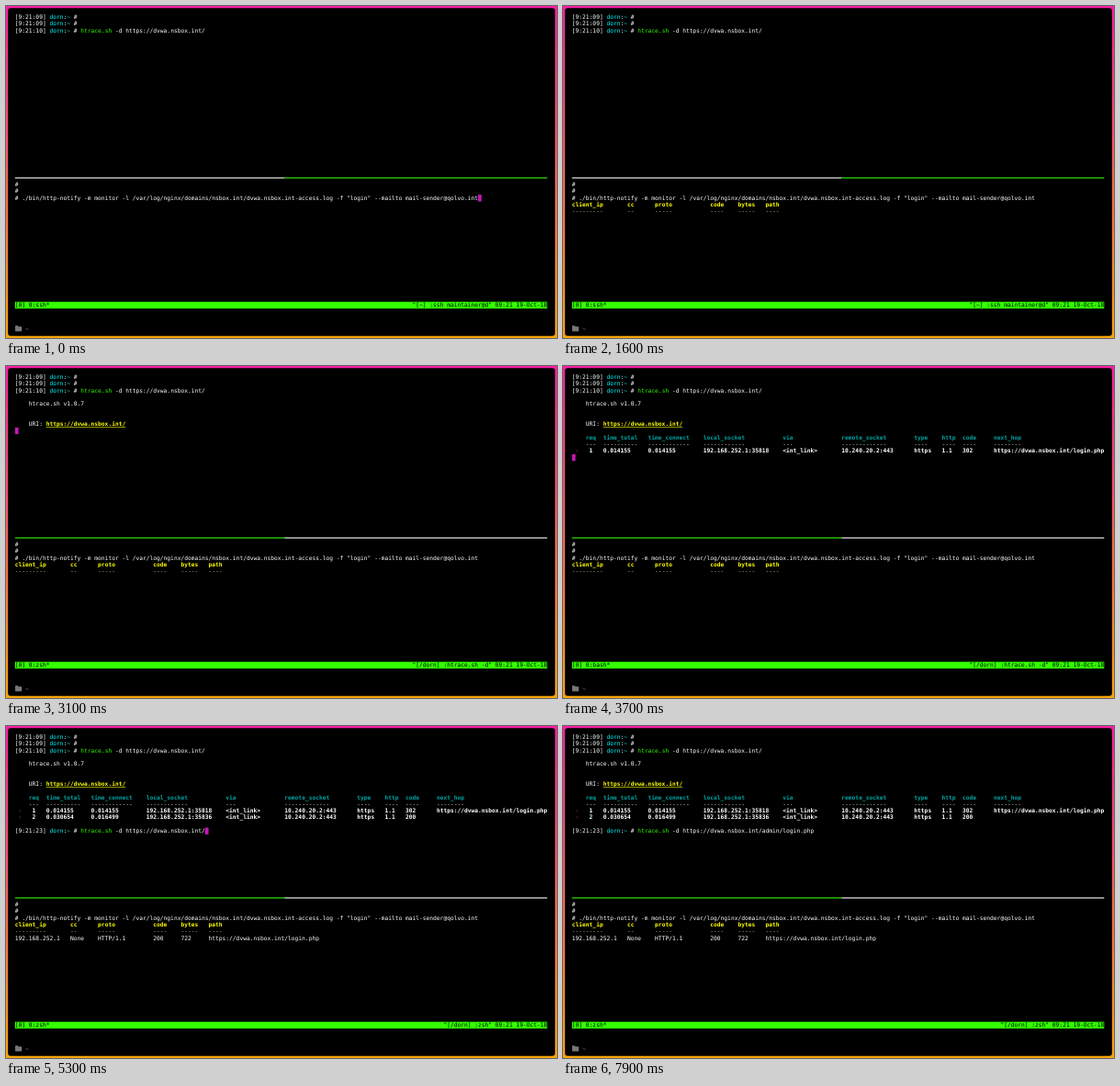
Animation of 600 by 361 pixels, one loop 8 s. Source, as an HTML page:

```html
<!DOCTYPE html>
<html lang="en">
<head>
<meta charset="utf-8">
<title>Terminal session</title>
<style>
  html, body { margin: 0; height: 100%; overflow: hidden; background: #000; }
  svg { display: block; }
  text {
    font: 6.25px "DejaVu Sans Mono", monospace;
    text-rendering: geometricPrecision;
    white-space: pre;
  }
  .bold { font-weight: bold; }
</style>
</head>
<body>
<svg id="stage" width="600" height="361" viewBox="0 0 600 361">
  <defs>
    <linearGradient id="edge" x1="0" y1="0" x2="0" y2="1">
      <stop offset="0" stop-color="#fc1da7"/>
      <stop offset="1" stop-color="#fba506"/>
    </linearGradient>
  </defs>
  <rect width="600" height="361" fill="url(#edge)"/>
  <rect x="2.15" y="2.15" width="595.7" height="356.7" rx="3"/>
  <path d="M10 348.2q0-.7.7-.7h2l.8.9h3q.7 0 .7.7v4q0 .7-.7.7h-5.8q-.7 0-.7-.7z" fill="#777"/>
  <text x="21" y="353.2" fill="#8a8a8a">~</text>
</svg>
<script>
const LOOP = 8000, COLS = 154, SPLIT = 78;
const X0 = 9.8, Y0 = 8.6, CW = 3.763, RH = 7.28, BASE = 5.53;
const WHITE = '#fff', CYAN = '#00ffff', TEAL = '#00a3a3', GREEN = '#33ff00',
      YELLOW = '#ffff00', GREY = '#808080', PINK = '#f81ce5';
const stage = document.getElementById('stage');
const timed = [];

const colX = c => X0 + c * CW;
const rowY = r => Y0 + r * RH;

function add(from, to, tag, attrs, content = '') {
  const el = document.createElementNS('http://www.w3.org/2000/svg', tag);
  for (const k in attrs) el.setAttribute(k, attrs[k]);
  el.textContent = content;
  stage.append(el);
  timed.push({ el, from, to });
}

function put(from, to, row, col, content, fill = WHITE, bold = false) {
  add(from, to, 'text',
    { x: colX(col), y: rowY(row) + BASE, fill, class: bold ? 'bold' : '' }, content);
}

function cells(from, row, cols, words, fill, bold) {
  words.forEach((word, i) => put(from, LOOP, row, cols[i], word, fill, bold));
}

const rules = words => words.map(w => '-'.repeat(w.length));

function block(from, to, row, col, width, fill, opacity = 1) {
  add(from, to, 'rect',
    { x: colX(col), y: rowY(row), width: width * CW, height: RH, fill, opacity });
}

const cursor = (from, to, row, col, opacity = 0.8) =>
  block(from, to, row, col, 1, PINK, opacity);

function prompt(from, row, clock) {
  put(from, LOOP, row, 0, `[${clock}]`);
  put(from, LOOP, row, 10, 'dorn', CYAN);
  put(from, LOOP, row, 14, ':');
  put(from, LOOP, row, 15, '~', CYAN);
  put(from, LOOP, row, 17, '#');
}

function trace(from, row) {
  put(from, LOOP, row, 19, 'htrace.sh', GREEN);
  put(from, LOOP, row, 29, '-d https://dvwa.nsbox.int/');
}

function divider(from, to, left, right) {
  const line = (a, b, fill) => add(from, to, 'rect',
    { x: colX(a), y: 186.4, width: (b - a) * CW, height: 1.1, fill });
  line(0, SPLIT, left);
  line(SPLIT, COLS, right);
}

// Upper pane
prompt(0, 0, '9:21:09');
prompt(0, 1, '9:21:09');
prompt(0, 2, '9:21:10');
trace(0, 2);

put(3100, LOOP, 4, 4, 'htrace.sh v1.0.7');
put(3100, LOOP, 7, 4, 'URI:');
put(3100, LOOP, 7, 9, 'https://dvwa.nsbox.int/', YELLOW, true);
add(3100, LOOP, 'rect',
  { x: colX(9), y: rowY(7) + BASE + 0.9, width: 23 * CW, height: 0.6, fill: YELLOW });

const hopCols = [4, 9, 22, 38, 61, 78, 99, 107, 113, 122];
const hopHead = ['req', 'time_total', 'time_connect', 'local_socket', 'via',
  'remote_socket', 'type', 'http', 'code', 'next_hop'];
cells(3700, 9, hopCols, hopHead, TEAL, true);
cells(3700, 10, hopCols, rules(hopHead), '#ddd');

function hop(from, row, req, total, connect, port, code, next) {
  put(from, LOOP, row, 1, '›', '#a33');
  cells(from, row, [5, ...hopCols.slice(1)],
    [req, total, connect, '192.168.252.1:' + port, '<int_link>',
      '10.240.20.2:443', 'https', '1.1', code, next], WHITE, true);
}
hop(3700, 11, '1', '0.014155', '0.014155', '35818', '302', 'https://dvwa.nsbox.int/login.php');
hop(3900, 12, '2', '0.030654', '0.016499', '35836', '200', '');

prompt(4100, 14, '9:21:23');
trace(5300, 14);

// Typed path with its grey completion
const path = 'admin/login.php';
[[6100, 6200, 1, false], [6200, 6300, 1, true], [6300, 6400, 2, true],
 [6400, 7100, 3, true], [7100, LOOP, path.length, false]]
  .forEach(([from, to, typed, hint]) => {
    put(from, to, 14, 55, path.slice(0, typed));
    if (hint) put(from, to, 14, 55 + typed, path.slice(typed), GREY);
  });

divider(0, 1900, WHITE, GREEN);
divider(1900, LOOP, GREEN, WHITE);

// Lower pane
put(0, LOOP, 25, 0, '#');
put(0, LOOP, 26, 0, '#');
put(0, LOOP, 27, 0, '# ./bin/http-notify -m monitor -l /var/log/nginx/domains/nsbox.int/' +
  'dvwa.nsbox.int-access.log -f "login" --mailto mail-sender@qolvo.int');

const logCols = [0, 16, 24, 40, 48, 56];
const logHead = ['client_ip', 'cc', 'proto', 'code', 'bytes', 'path'];
cells(800, 28, logCols, logHead, YELLOW, true);
cells(800, 29, logCols, rules(logHead), '#c8c88a');
cells(3900, 30, logCols,
  ['192.168.252.1', 'None', 'HTTP/1.1', '200', '722', 'https://dvwa.nsbox.int/login.php']);

// Status bar
block(0, LOOP, 43, 0, COLS, GREEN);
[[0, 1900, 'ssh'], [1900, 3700, 'zsh'], [3700, 5300, 'bash'], [5300, LOOP, 'zsh']]
  .forEach(([from, to, name]) => put(from, to, 43, 0, `[0] 0:${name}*`, '#000'));
[[0, 1900, '[~] :ssh maintainer@d'], [1900, 3100, '[/dorn] :zsh'],
 [3100, 4100, '[/dorn] :htrace.sh -d'], [4100, LOOP, '[/dorn] :zsh']]
  .forEach(([from, to, title]) => {
    const label = `"${title}" 09:21 19-Oct-18`;
    put(from, to, 43, COLS - label.length, label, '#000');
  });

// Cursor: from, to, row, column, opacity
[[0, 400, 27, 134], [400, 500, 27, 134, 0.4],
 [800, 900, 30, 0, 0.4], [900, 1600, 30, 0],
 [1900, 2600, 2, 55],
 [3000, 3100, 3, 0], [3100, 3700, 8, 0], [3700, 3900, 12, 0], [3900, 4100, 13, 0],
 [4100, 4200, 14, 19, 0.4], [4200, 4900, 14, 19],
 [5300, 6100, 14, 55], [6100, 6300, 14, 56], [6300, 6400, 14, 57], [6400, 7100, 14, 58],
 [7100, 7200, 14, 70, 0.4], [7200, 7900, 14, 70]]
  .forEach(step => cursor(...step));

const start = performance.now();
function draw(now) {
  const t = Math.max(0, now - start) % LOOP;
  for (const { el, from, to } of timed)
    el.style.display = t >= from && t < to ? '' : 'none';
  requestAnimationFrame(draw);
}
draw(start);
</script>
</body>
</html>
```
